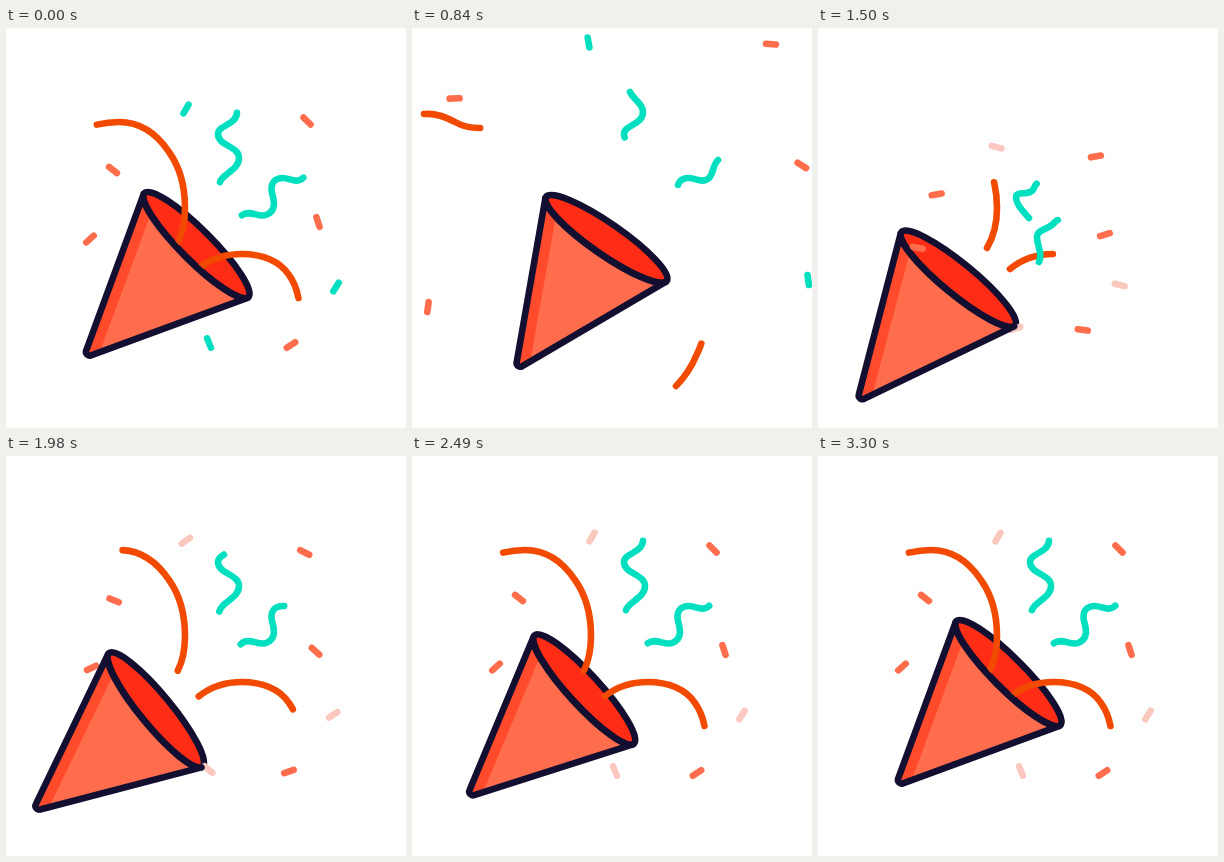
These frames come from a looping animation (400 px wide and 400 px high, 5.33 s). An HTML page:

```html
<!DOCTYPE html>
<html lang="en">
<head>
<meta charset="utf-8">
<title>Party popper</title>
<style>
  html, body { margin: 0; width: 100%; height: 100%; overflow: hidden; background: #fff; }
  svg { display: block; width: 100%; height: 100%; }
</style>
</head>
<body>
<svg viewBox="0 0 400 400" stroke-width="6.6" stroke-linecap="round" stroke-linejoin="round" fill="none">
  <defs>
    <path id="body" d="M-1.2-73.4L-152.5-3.4A3.7 3.7 0 0 0-152.5 3.4L-1.2 73.4A15.5 73.5 0 0 1-1.2-73.4Z"/>
    <clipPath id="inside"><use href="#body"/></clipPath>
  </defs>
  <g class="cone"><ellipse rx="15.5" ry="73.5" fill="#ff2c16" stroke="#130f30"/></g>
  <g id="ribbons"></g>
  <g id="confetti"></g>
  <g class="cone">
    <use href="#body" fill="#ff6d4d"/>
    <path d="M-160-.3L6-76.7" stroke="#ff4a2c" stroke-width="27" clip-path="url(#inside)"/>
    <use href="#body" stroke="#130f30"/>
  </g>
</svg>
<script>
const LOOP = 5330, STEP = 30, REST = 3300;
const BURST = 1230, POP = 1290, RECOIL = 1740;
const ORANGE = '#f24a00', CORAL = '#ff6d4d', TEAL = '#00dfc0', PINK = '#fbc8c0';

const span = (t, from, length) => Math.max(0, Math.min(1, (t - from) / length));
const mix = (a, b, p) => a + (b - a) * p;
const swing = u => (1 - Math.cos(Math.PI * u)) / 2;
const easeOut = (u, power) => 1 - (1 - u) ** power;
const decay = (u, k) => (1 - Math.exp(-k * u)) / (1 - Math.exp(-k));

function add(parent, d, stroke) {
  const el = document.createElementNS('http://www.w3.org/2000/svg', 'path');
  el.setAttribute('d', d);
  el.setAttribute('stroke', stroke);
  document.getElementById(parent).append(el);
  return el;
}

// The cone leans forward, kicks back, then returns; it turns about a pivot inside the body.
const cones = document.querySelectorAll('.cone');
const rest = { x: 160, y: 247.5, turn: 0 };
const lean = { x: 174.5, y: 245.6, turn: -15 };
const kick = { x: 113, y: 284, turn: 6 };

function drawCone(t) {
  const forward = span(t, 0, BURST);
  const shove = easeOut(span(t, POP, 150), 2);
  const twist = swing(span(t, POP, RECOIL - POP));
  const back = swing(span(t, RECOIL, 1350));
  const at = (key, push) => mix(mix(mix(rest[key], lean[key], forward), kick[key], push), rest[key], back);
  const pose = `translate(${at('x', shove)} ${at('y', shove)}) rotate(${at('turn', twist) - 45}) translate(43)`;
  for (const cone of cones) cone.setAttribute('transform', pose);
}

// Ribbons show the stretch of their path between tail and tip.
const ribbons = [
  { color: ORANGE, tail: 6, tip: 184, lag: 1.15, drift: 0,
    d: 'M169 220C176 208 179 197 179 180C179 158 173 138 163 124C153 109 138 94 113 94' +
       'C92 94 86 100 68 100C58 100 50 98 43 94C33 89 24 85 12 86' },
  { color: ORANGE, tail: 1, tip: 126, lag: 1.15, drift: 0,
    d: 'M192 241C204 231 219 226 236 226C256 226 274 233 283 247C291 258 294 273 294 286' +
       'C294 300 291 314 285 326C280 338 273 349 264 358' },
  { color: TEAL, tail: 47, tip: 142, lag: 3, drift: 6,
    d: 'M209 184C203 177 196 171 196 163C196 156 211 163 214 154C216 146 233 142 233 130' +
       'C233 118 212 118 212 106C212 97 231 97 231 84C231 76 222 72 218 64' },
  { color: TEAL, tail: 51, tip: 145, lag: 3, drift: 6,
    d: 'M219 228C223 219 217 212 217 203C217 195 228 196 234 189C242 180 252 190 260 187' +
       'C271 183 268 172 266 165C264 156 268 150 277 150C284 150 290 156 297 150C302 145 300 138 306 132' }
];
for (const r of ribbons) {
  r.el = add('ribbons', r.d, r.color);
  r.length = r.el.getTotalLength();
}

function drawRibbon(r, t) {
  let { tail, tip } = r, drop = 0;
  if (t < BURST) {
    const run = (r.length - tail) * span(t, 0, 1050) ** r.lag;
    tail += run;
    tip += run * 0.56;
  } else {
    tip *= easeOut(span(t, POP, 1300), 2.6);
    tail *= easeOut(span(t, 1500, 700), 3);
    drop = r.drift * (1 - span(t, 1500, 480));
  }
  const shown = Math.min(tip, r.length) - tail;
  r.el.style.display = shown > 0.5 ? '' : 'none';
  r.el.setAttribute('stroke-dasharray', `${shown} 999`);
  r.el.setAttribute('stroke-dashoffset', -tail);
  r.el.setAttribute('transform', `translate(${drop / 3} ${drop})`);
}

// Confetti at rest: position, angle and the heading in which it flies off
const TEAL_SPEED = 72, CORAL_SPEED = 104;
const source = { x: 172, y: 250 };
const piece = (cool, x, y, angle, heading) => ({
  cool, x, y, angle, heading: heading * Math.PI / 180,
  out: add('confetti', 'M-5 0H5', cool ? TEAL : CORAL),
  back: add('confetti', 'M-5 0H5', cool ? PINK : CORAL)
});
const pieces = [
  piece(true, 180, 81, -60, -93),
  piece(false, 301, 93, 45, -53),
  piece(false, 107, 142, 38, -132),
  piece(false, 84, 211, -42, 135),
  piece(false, 312, 194, 72, -36),
  piece(true, 330, 259, -58, -6),
  piece(false, 285, 317, -33, 29),
  piece(true, 203, 315, 68, 64)
];

function place(el, x, y, angle, opacity) {
  el.setAttribute('transform', `translate(${x} ${y}) rotate(${angle})`);
  el.setAttribute('opacity', opacity);
}

function drawPiece(p, t) {
  const far = (p.cool ? TEAL_SPEED : CORAL_SPEED) * decay(span(t, 0, BURST), 3.2);
  const fade = 1 - span(t, 1440 - 2.2 * p.y, 60);  // the lower ones vanish first
  place(p.out, p.x + far * Math.cos(p.heading), p.y + far * Math.sin(p.heading), p.angle + t / 6, fade);

  const u = span(t, BURST, 990), left = 1 - decay(u, 3.9);
  place(p.back, p.x - 0.54 * (p.x - source.x) * left, p.y - 0.68 * (p.y - source.y) * left,
    p.angle * (1 - 1.7 * (1 - u)), t >= BURST ? 1 : 0);
}

function draw(t) {
  drawCone(t);
  for (const r of ribbons) drawRibbon(r, t);
  for (const p of pieces) drawPiece(p, t);
}

const start = performance.now();
function frame() {
  const t = (performance.now() - start) % LOOP;
  draw(Math.min(REST, Math.floor(t / STEP) * STEP));
  requestAnimationFrame(frame);
}
frame();
</script>
</body>
</html>
```
